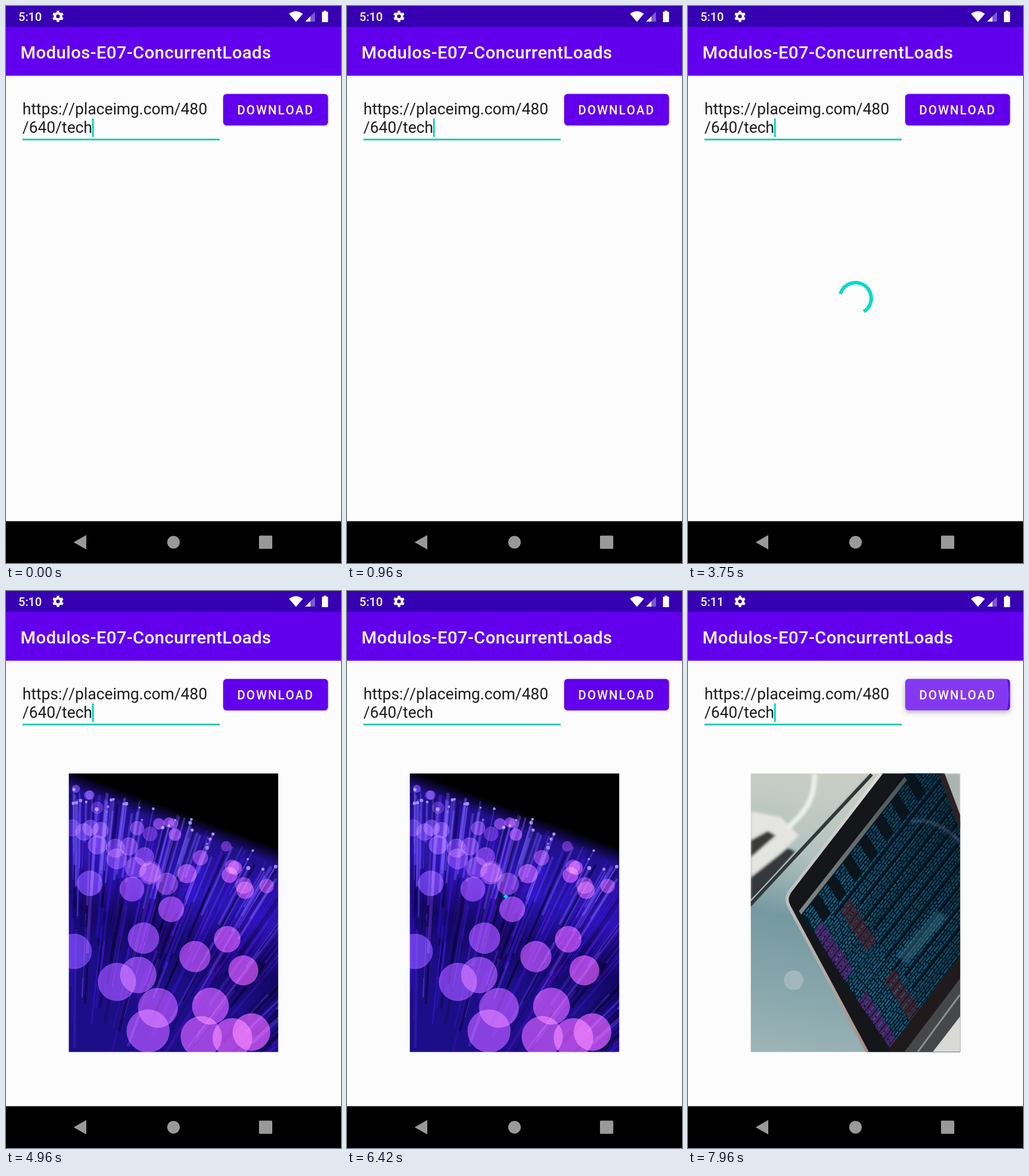
Write an HTML page that moves like this. It is 580x966 px and loops after 8 s.

```html
<!DOCTYPE html>
<html lang="en">
<head>
<meta charset="utf-8">
<title>Background download demo</title>
<style>
  html, body { margin: 0; width: 100%; height: 100%; overflow: hidden; background: #fcfcfd; }
  svg { display: block; width: 580px; height: 966px; font-family: Roboto, sans-serif; font-kerning: none; }
  .medium { font-weight: 500; fill: #fff; }
  .glow { mix-blend-mode: screen; }
</style>
</head>
<body>
<svg viewBox="0 0 580 966">
  <defs>
    <clipPath id="buttonClip"><rect x="376" y="152.500" width="181.500" height="54.500" rx="6"/></clipPath>
    <clipPath id="photoClip"><rect x="108.750" y="316.400" width="362.500" height="483"/></clipPath>
    <clipPath id="screenClip"><path d="M376 316H440L471 402V632L349 792 190 556Z"/></clipPath>
    <linearGradient id="fiberGlow" gradientUnits="userSpaceOnUse" x1="290" y1="378" x2="190" y2="646">
      <stop stop-color="#000"/><stop offset=".1" stop-color="#20108a"/>
      <stop offset=".45" stop-color="#2c14b4"/><stop offset=".75" stop-color="#130763"/>
      <stop offset="1" stop-color="#1c0e86"/>
    </linearGradient>
    <linearGradient id="desk" x1=".3" y1="0" x2=".15" y2="1">
      <stop stop-color="#c9cec5"/><stop offset=".28" stop-color="#b4c3c0"/>
      <stop offset=".52" stop-color="#7599a1"/><stop offset=".8" stop-color="#89a8ad"/>
      <stop offset="1" stop-color="#9db4b6"/>
    </linearGradient>
    <linearGradient id="rim" x1="0" y1="0" x2="0" y2="1">
      <stop stop-color="#dcdcda"/><stop offset=".5" stop-color="#b9bcbc"/><stop offset="1" stop-color="#a48f83"/>
    </linearGradient>
    <linearGradient id="screenShade" x1="0" y1="1" x2="1" y2=".3">
      <stop stop-color="#04121c" stop-opacity="0"/><stop offset="1" stop-color="#04121c" stop-opacity=".6"/>
    </linearGradient>
    <filter id="soft"><feGaussianBlur stdDeviation="2"/></filter>
  </defs>

  <rect width="580" height="966" fill="#fcfcfd"/>
  <rect width="580" height="120.900" fill="#6200ee"/>
  <rect width="580" height="36.300" fill="#3700b3"/>
  <rect y="893.500" width="580" height="73" fill="#000"/>

  <text id="clock" class="medium" x="21.500" y="26" font-size="20.500">5:10</text>
  <g fill="none" stroke="#fff">
    <circle cx="90" cy="18" r="5.400" stroke-width="4.400"/>
    <circle cx="90" cy="18" r="8" stroke-width="3.600" pathLength="12" stroke-dasharray="1" stroke-dashoffset="1.500"/>
  </g>
  <g fill="#fff">
    <path d="M490 13.500Q502 4.500 514 13.500L502 27.500Z"/>
    <path d="M518 27L535 10V27Z" opacity=".35"/><path d="M518 27L527 18V27Z"/>
    <path d="M547 10H550V8H554.500V10H557.500V28H547Z"/>
  </g>
  <text class="medium" x="25" y="90.500" font-size="30.200" letter-spacing=".45">Modulos-E07-ConcurrentLoads</text>

  <g font-size="27.200" fill="#1d1d1f">
    <text x="28.500" y="188">https://placeimg.com/480</text>
    <text x="28.500" y="220">/640/tech</text>
  </g>
  <rect x="28.500" y="230" width="341.500" height="3.200" fill="#33c9b7"/>
  <rect id="cursor" x="149" y="195" width="3" height="32" fill="#03dac5"/>

  <rect id="button" x="376" y="152.500" width="181.500" height="54.500" rx="6" fill="#6200ee"/>
  <circle id="ripple" cx="436" cy="180" fill="#fff" clip-path="url(#buttonClip)"/>
  <text class="medium" x="400.300" y="188" font-size="21.150" letter-spacing="2.100">DOWNLOAD</text>

  <g clip-path="url(#photoClip)">
    <g id="fibers"></g>
    <g id="laptop"></g>
  </g>
  <circle id="spinner" cx="290" cy="507" r="27.250" fill="none" stroke="#03dac5" stroke-width="6.060" stroke-linecap="square" pathLength="360"/>

  <g fill="#999">
    <path d="M117 930L139 917.500V942.500Z"/><circle cx="290" cy="930" r="10.900"/>
    <rect x="438" y="918.500" width="23" height="23" rx="1.500"/>
  </g>
</svg>
<script>
const LOOP = 8000;
const PRESS_HOLD = 110;
const CYCLE = 1333; // one grow-and-shrink of the spinner arc
const downloads = [{ from: 2085, to: 4250 }, { from: 5100, to: 6790 }];
const pressStarts = [...downloads.map(d => d.from - PRESS_HOLD), 7800];
const $ = id => document.getElementById(id);
const clamp = x => Math.min(1, Math.max(0, x));
const show = (id, on) => $(id).setAttribute('visibility', on ? 'visible' : 'hidden');
const setAttrs = (id, attrs) => { for (const k in attrs) $(id).setAttribute(k, attrs[k]); };

const shape = (d, fill) => `<path d="${d}" fill="${fill}"/>`;
const line = (d, color, width, extra = '') =>
  `<path d="${d}" fill="none" stroke="${color}" stroke-width="${width}" ${extra}/>`;
const block = (x, y, w, h, fill) => `<rect x="${x}" y="${y}" width="${w}" height="${h}" fill="${fill}"/>`;
const backdrop = fill => block(108, 316, 364, 484, fill);

function seeded(seed) {
  return () => (seed = (seed * 16807) % 2147483647) / 2147483647;
}

function drawFibers() {
  const rand = seeded(41);
  const tipY = x => 336 + 132 * Math.max(0, (x - 109) / 362) ** 1.5;
  let out = backdrop('url(#fiberGlow)');

  // Strands fan out from one point below the picture.
  const strand = (x, y, reach, color, width, extra) =>
    line(`M${x} ${y}l${(115 - x) * reach} ${(1060 - y) * reach}`, color, width, extra);
  for (let i = 0; i < 200; i++) {
    const x = 100 + rand() * 540, depth = rand() ** 1.5 * 260;
    const color = rand() < 0.42 ? '#06021f' : `hsl(${246 + rand() * 14} 85% ${38 + rand() * 26}%)`;
    out += strand(x, tipY(x) + 8 + depth, 0.1 + rand() * 0.35, color, 1 + rand() * 5, `opacity="${0.2 + rand() * 0.4}"`);
  }
  for (let i = 0; i < 60; i++) {
    const x = 112 + rand() * 358, y = tipY(x) + rand() * 40;
    out += strand(x, y, 0.1 + rand() * 0.12, '#7d62ff', 1 + rand() * 4, 'opacity=".4"');
    if (i % 2) out += `<circle cx="${x}" cy="${y}" r="${1.5 + rand() * 2}" fill="#a78cff"/>`;
  }

  // Out-of-focus discs grow with their distance below the strand tips and turn pink to the lower right.
  const disc = (x, y, alpha) => {
    const depth = Math.max(0, y - tipY(x)), pink = clamp((x - 150 + depth * 0.2) / 330);
    out += `<circle class="glow" cx="${x}" cy="${y}" r="${5 + 0.36 * depth ** 0.75}" fill-opacity="${alpha}"
      fill="hsl(${252 + 36 * pink} 82% ${58 + 4 * pink}%)" stroke="#b080ff" stroke-opacity=".3"/>`;
  };
  const largeDiscs = [[118, 625], [192, 678], [229, 666], [263, 723], [246, 763], [238, 602], [286, 552], [354, 720],
    [338, 773], [392, 775], [425, 765], [383, 604], [327, 634], [411, 658], [145, 507], [218, 517]];
  largeDiscs.forEach(([x, y]) => disc(x, y, 0.78));
  for (let i = 0; i < 32; i++) {
    const x = 112 + rand() * 358;
    disc(x, tipY(x) + 6 + rand() * 125, 0.45 + rand() * 0.35);
  }
  $('fibers').innerHTML = `<g style="isolation:isolate">${out}</g>`;
}

function drawScreen() {
  const rand = seeded(7);
  // x runs along a text row, y goes down the rows.
  let out = block(0, 0, 230, 130, '#06202f');
  for (let y = 4; y < 130; y += 1.7) {
    const dash = `${1 + rand() * 2} ${0.5 + rand() * 0.6} ${2 + rand() * 3} .7`;
    out += line(`M${1 + rand() * 2} ${y}H230`, `hsl(199 ${55 + rand() * 20}% ${32 + rand() * 12}%)`, 0.95, `stroke-dasharray="${dash}"`);
  }
  for (let x = 9; x < 100; x += 15) out += block(x, 3.5, 7, 13, '#11141a');
  for (let y = 19; y < 95; y += 8.5) out += block(10 + rand() * 28, y, 60 + rand() * 60, 1.4, '#061019');
  for (let y = 16; y < 108; y += 2.5) {
    if (y % 50 > 14) out += block(1, y, 8, 1.5, '#7a1c86');
    if (y % 50 > 20) out += block(22, y, 9, 1.5, '#74222d');
  }
  return out + block(0, 0, 100, 2.6, '#a9aca4');
}

function drawLaptop() {
  const lid = 'M336 314L178 519Q167 533 175 547L312 803';
  $('laptop').innerHTML = backdrop('url(#desk)')
    + '<g filter="url(#soft)">'
    + shape('M109 382L160 392 192 424 109 505Z', '#e4e4e0')
    + shape('M109 432L138 416 152 424 109 462Z', '#3b3a3a')
    + shape('M109 496L172 446 186 452 109 545Z', '#34383c')
    + line('M172 412C200 385 220 365 219 317', '#eceeea', 9)
    + shape('M438 317H471V400Z', '#aab4b0')
    + '</g>'
    + line('M106 546L318 318', '#30383c', 6) + line('M106 540L312 318', '#b9c2c2', 2)
    + '<circle cx="183" cy="675" r="17" fill="#a2b7b9"/>'
    + shape(lid + 'H480V420L436 314Z', '#15161a') + line(lid, 'url(#rim)', 5.5)
    + shape('M471 632L345 792 350 799H385L471 682Z', '#201a1c')
    + shape('M471 672L375 799H471Z', '#45474b')
    + shape('M471 738L424 799H471Z', '#d9d9d6')
    + line('M471 700L398 799', '#8d8f90', 3)
    + `<g clip-path="url(#screenClip)"><g transform="matrix(1.83 -2.33 1.53 2.44 192 555)">${drawScreen()}</g>`
    + backdrop('url(#screenShade)')
    + `<g filter="url(#soft)" opacity=".3">${line('M385 400Q430 390 475 440', '#9a9ac0', 5)}
       ${line('M370 640L440 560', '#5aa0b8', 22)}</g></g>`
    + line('M438 314L474 410', '#2a2226', 10);
}

// Height at x on a cubic Bezier that is flat at both ends and rises from 0 to 1.
function bezierAt(x, x0, x1, x2, x3) {
  let lo = 0, hi = 1;
  for (let i = 0; i < 24; i++) {
    const s = (lo + hi) / 2, q = 1 - s;
    if (x0 * q ** 3 + 3 * x1 * s * q * q + 3 * x2 * s * s * q + x3 * s ** 3 < x) lo = s; else hi = s;
  }
  return lo * lo * (3 - 2 * lo);
}
const arcTail = u => u < 0.5 ? 0 : bezierAt(u, 0.5, 0.7, 0.6, 1);
const arcHead = u => u > 0.5 ? 1 : bezierAt(u, 0, 0.2, 0.1, 0.5);

function drawSpinner(t) {
  const active = downloads.find(d => t >= d.from && t < d.to);
  show('spinner', active);
  if (!active) return;
  const age = t - active.from, u = age / CYCLE % 1;
  const start = 720 * age / 4444 + 90 * u + 270 * arcTail(u);
  const length = Math.max(0.5, 270 * (arcHead(u) - arcTail(u)));
  setAttrs('spinner', { transform: `rotate(${start - 90} 290 507)`, 'stroke-dasharray': `${length} 720` });
}

function drawPress(t) {
  const down = pressStarts.findLast(start => t >= start) ?? Infinity;
  const age = Math.max(0, t - down);
  const hold = down === pressStarts.at(-1) ? LOOP : PRESS_HOLD;
  const level = clamp(age / 75) * (1 - clamp((age - hold) / 250));
  setAttrs('ripple', { r: 130 * (1 - (1 - clamp(age / 225)) ** 2), opacity: 0.22 * level });
  $('button').style.filter = `drop-shadow(0 ${1 + 2 * level}px ${1 + 3 * level}px rgba(0,0,0,.3))`;
}

function frame() {
  const t = (performance.now() - began) % LOOP;
  const [first, second] = downloads.map(d => d.to);
  show('cursor', (t + 330) % 1000 < 500);
  show('fibers', t >= first && t < second);
  show('laptop', t >= second);
  $('clock').textContent = t < second ? '5:10' : '5:11';
  drawSpinner(t);
  drawPress(t);
  requestAnimationFrame(frame);
}

drawFibers();
drawLaptop();
const began = performance.now();
frame();
</script>
</body>
</html>
```
